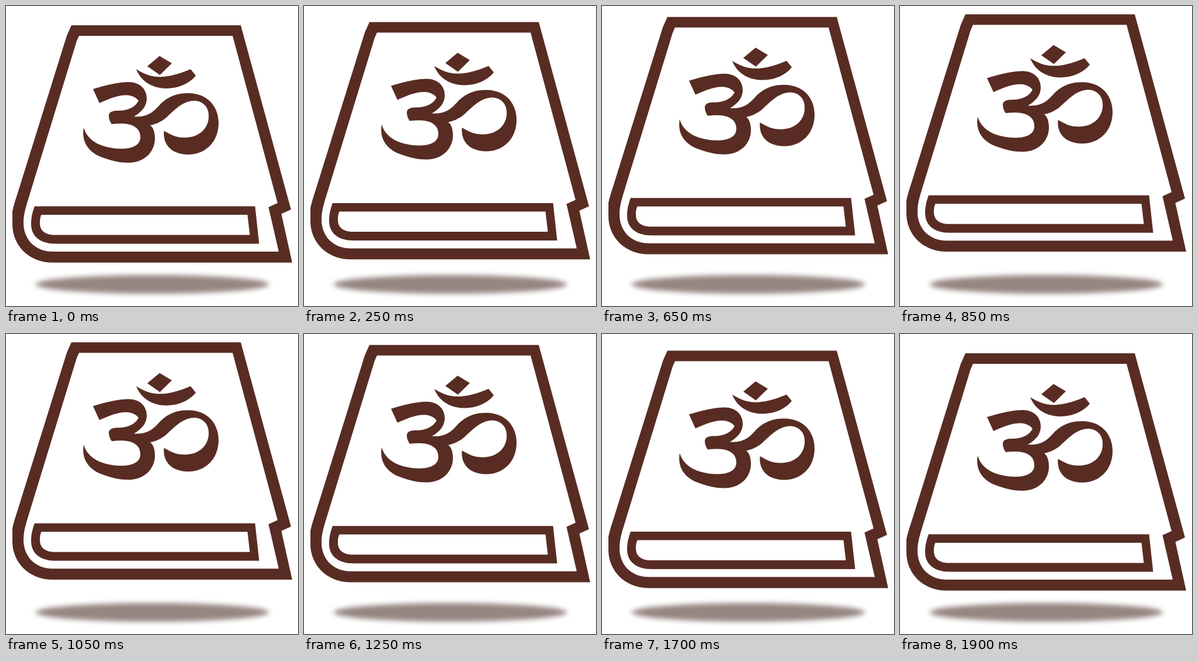
Recreate the animation shown at these times as an HTML page with a canvas. Size 500 px wide and 513 px high, loop 1950 ms.

```html
<!DOCTYPE html>
<html lang="en">
<head>
<meta charset="utf-8">
<title>Floating book</title>
<style>
html, body { margin: 0; width: 100%; height: 100%; overflow: hidden; background: #fff; }
canvas { display: block; }
</style>
</head>
<body>
<canvas id="stage" width="500" height="513"></canvas>
<script>
const ctx = document.getElementById('stage').getContext('2d');
const BROWN = '#582c23';
const SHADOW = '#968682';
const LOOP = 1950, STEP = 50, PEAK = 950, RISE = 21;

const cover = new Path2D(
  'M112 33H402L488 348L471.5 355.5L490 438.8H80C38 438.8 11 408 11 374V351C13 341 16 332 19 323L104 51Z' +
  'M125 51L121 60L37 334C33 347 30 358 30 371C30 398 49 420 80 420H467L449.5 344L465 337L388 51Z');

const pages = new Path2D(
  'M49 342.5H426.5L433.5 406.5H84C58 406.5 43 393 43 373C43 361 45.5 352 49 342.5Z' +
  'M60.5 357C58.5 362 58 365 58 371C58 384 67 391.5 84 391.5H417.5L413.5 357Z');

const symbol = new Path2D(
  'M263 85.5L284 98L263.5 118L242 103Z' +
  'M223 108C248 124 270 127 316 108L325 119C302 148 240 152 223 108Z' +
  'M149 142C175 134 195 130 210 130C229 130 241 142 241 158C241 171 233 181 219 189' +
  'C245 191 255 178 265 167C280 153 295 149 312 149C343 149 364 170 364 200' +
  'C364 232 342 254 312 254C285 254 268 238 270.5 213.5C284 221 292 225.5 308 225' +
  'C335 224 348 205 347 187C347 172 336 162 322 162C300 163 287 180 273 192' +
  'C264 199 256 202 247 204C252 208 255 215 255 227C255 248 238 268 210 268' +
  'C195 268 180 265 160 257C140 248 129 231 133 208C140 232 165 243 195 244' +
  'C214 244.5 231 239 230 223C229 202 205 199 181 202C178 198 176 193 176 187' +
  'C177 180 184 179 192 179C210 179 222 172 227 162C212 143 180 157 160 166Z');

function drawShadow() {
  ctx.save();
  ctx.filter = 'blur(4px)';
  ctx.fillStyle = SHADOW;
  ctx.beginPath();
  ctx.ellipse(250.5, 476, 200, 16, 0, 0, Math.PI * 2);
  ctx.fill();
  ctx.restore();
}

// Steady climb to the peak, then the same way down.
function lift(ms) {
  const t = Math.floor((ms % LOOP) / STEP) * STEP;
  return RISE * (1 - Math.abs(t - PEAK) / PEAK);
}

function draw(ms) {
  ctx.fillStyle = '#fff';
  ctx.fillRect(0, 0, 500, 513);
  drawShadow();
  ctx.save();
  ctx.translate(0, -lift(ms));
  ctx.fillStyle = BROWN;
  ctx.fill(cover, 'evenodd');
  ctx.fill(pages, 'evenodd');
  ctx.fill(symbol);
  ctx.restore();
}

const start = performance.now();
function tick() {
  draw(performance.now() - start);
  requestAnimationFrame(tick);
}
tick();
</script>
</body>
</html>
```
